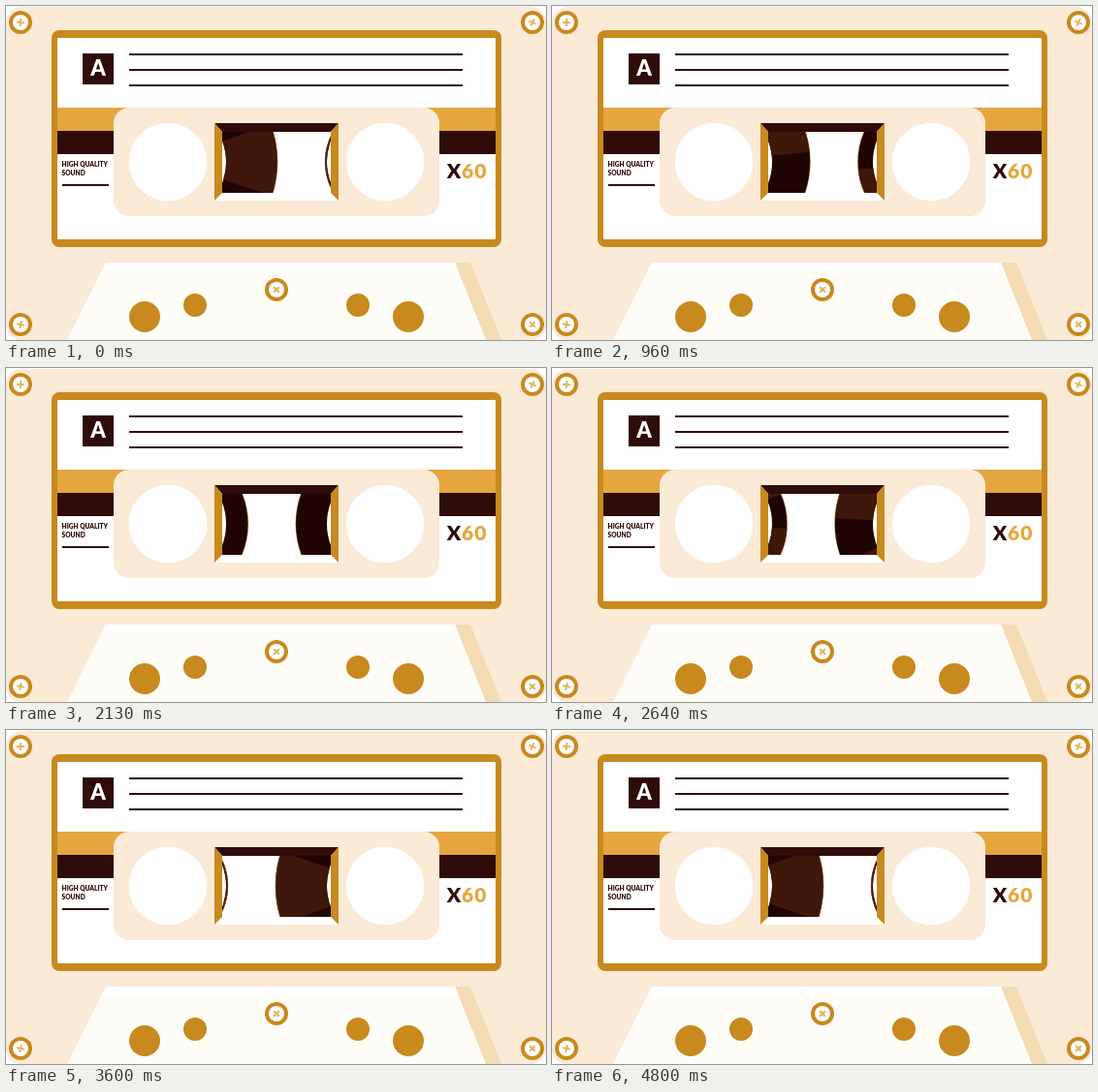
An HTML page for the animation above (5100 ms loop, 557 by 345 pixels).

```html
<!DOCTYPE html>
<html lang="en">
<head>
<meta charset="utf-8">
<title>Cassette</title>
<style>
  html, body { margin: 0; width: 100%; height: 100%; overflow: hidden; background: #fff; }
  svg { display: block; width: 557px; height: 345px; }
  text { font-family: Lato, sans-serif; font-weight: 900; }
  .gold { fill: #c8891e; }
  .amber { fill: #e6a63f; }
  .dark { fill: #2f0b09; }
  .cream { fill: #faead6; }
  .white { fill: #fff; }
  .reel circle { fill: none; }
  .tape { stroke: #200504; }
  .shine { stroke: #3f170b; stroke-dasharray: 8 27.5 38.5 286; }
  .rim { stroke: #c8891e; stroke-width: .6; stroke-opacity: .6; }
</style>
</head>
<body>
<svg viewBox="0 0 557 345">
  <defs>
    <clipPath id="glass"><rect x="223" y="130" width="112" height="63"/></clipPath>
    <g id="screw">
      <circle r="12" class="gold"/>
      <circle r="8" class="white"/>
    </g>
    <path id="cross" d="M-4 0H4M0-4V4" stroke="#e6b258" stroke-width="2"/>
    <g id="reel" class="reel">
      <circle class="tape"/>
      <circle class="shine" pathLength="360"/>
      <circle class="rim"/>
    </g>
  </defs>

  <rect y="1" width="557" height="344" rx="16" class="cream"/>

  <!-- label -->
  <rect x="47" y="25" width="464" height="224" rx="8" class="gold"/>
  <rect x="53" y="33" width="452" height="208" rx="1" class="white"/>
  <rect x="79" y="49" width="32" height="32" class="dark"/>
  <text x="95" y="72" font-size="22" text-anchor="middle" class="white">A</text>
  <path d="M127 50H471M127 66H471M127 82H471" stroke="#2f0b09" stroke-width="2"/>
  <rect x="53" y="105" width="452" height="24" class="amber"/>
  <rect x="53" y="129" width="452" height="24" class="dark"/>
  <g font-size="6.6" class="dark">
    <text x="57.6" y="166">HIGH QUALITY</text>
    <text x="57.6" y="175">SOUND</text>
  </g>
  <rect x="58" y="184" width="48" height="2" class="dark"/>
  <g font-size="21" letter-spacing="1">
    <text x="454.7" y="178" class="dark">X</text>
    <text x="470" y="178" class="amber">60</text>
  </g>

  <!-- window -->
  <rect x="111" y="105" width="336" height="112" rx="16" class="cream"/>
  <circle cx="167" cy="161" r="40.3" class="white"/>
  <circle cx="391" cy="161" r="40.3" class="white"/>
  <rect x="215" y="121" width="128" height="80" class="white"/>
  <g id="reels" clip-path="url(#glass)"></g>
  <path d="M215 121H343L335 130H223Z" class="dark"/>
  <path d="M215 121L223 130V193L215 201ZM343 121L335 130V193L343 201Z" class="gold"/>

  <!-- foot -->
  <path d="M463 265H479L511 345H495Z" fill="#f3dbb4"/>
  <path d="M103 265H463L495 345H63Z" fill="#fefcf7"/>
  <path d="M103 265H463L466.2 273H99Z" class="white"/>
  <g class="gold">
    <circle cx="143" cy="321" r="16"/>
    <circle cx="195" cy="309" r="12"/>
    <circle cx="363" cy="309" r="12"/>
    <circle cx="415" cy="321" r="16"/>
  </g>
  <g id="screws"></g>
</svg>
<script>
const LOOP = 5100, STEP = 30;
const PLAY = 3600, REWIND_AT = 3900, REWIND = 900;
const HUB = 60, THIN = 62, FULL = 113, TURNS = 4;

const el = id => document.getElementById(id);

// x, y, angle of the cross
const screws = [[15, 17, 5], [543, 17, 25], [15, 329, 12], [543, 329, 45], [279, 293, 45]];
el('screws').innerHTML = screws.map(([x, y, a]) =>
  `<g transform="translate(${x} ${y})"><use href="#screw"/><use href="#cross" transform="rotate(${a})"/></g>`
).join('');

function makeReel(x, phase) {
  const node = el('reel').cloneNode(true);
  node.removeAttribute('id');
  node.setAttribute('transform', `translate(${x} 161)`);
  el('reels').append(node);
  const [tape, shine, rim] = node.children;
  return (radius, angle) => {
    for (const ring of [tape, shine]) {
      ring.setAttribute('r', (radius + HUB) / 2);
      ring.setAttribute('stroke-width', radius - HUB);
    }
    shine.setAttribute('transform', `rotate(${angle + phase - 56})`);
    rim.setAttribute('r', radius);
  };
}

const left = makeReel(167, 0);
const right = makeReel(391, 180);

function progress(t) {
  if (t < REWIND_AT) return Math.min(t / PLAY, 1);
  return Math.max(1 - (t - REWIND_AT) / REWIND, 0);
}

function draw(now) {
  const t = Math.floor((now % LOOP) / STEP) * STEP;
  const p = progress(t);
  const wound = (FULL - THIN) * p;
  const angle = -360 * TURNS * p;
  left(FULL - wound, angle);
  right(THIN + wound, angle);
}

const start = performance.now();
function tick() {
  draw(performance.now() - start);
  requestAnimationFrame(tick);
}
tick();
</script>
</body>
</html>
```
